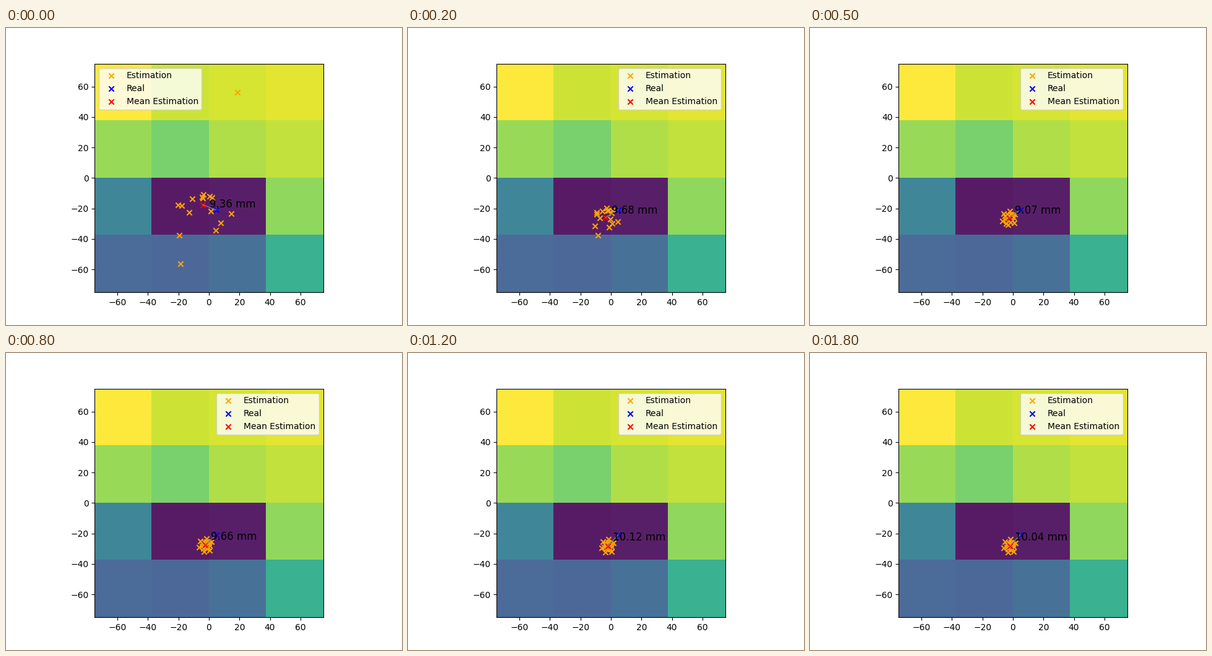
A matplotlib script that plays this animation: 640x480 px, repeating every 1.9 s.

```python
import numpy as np
import matplotlib.pyplot as plt
from matplotlib.animation import FuncAnimation

FRAMES = 19
DECAY = 0.55

# Points in the plane are complex numbers: x + iy
REAL = 4.75 - 20.9j
OUTLIER = 18.7 + 56.2j

# Distance and bearing of the mean, as seen from the real position
STEPS = [0, 1, 2, 5, 8, 12, 18]
DISTANCE = [9.36, 8.24, 9.68, 9.07, 9.66, 10.12, 10.04]
BEARING = [159, 188, 211, 216, 223.5, 226.5, 227]

HEAT = [
    [1.0, 0.915, 0.93, 0.955],
    [0.83, 0.77, 0.87, 0.90],
    [0.40, 0.0, 0.012, 0.815],
    [0.285, 0.27, 0.31, 0.605],
]


def ring(count, radius, start, step):
    angles = np.radians(start + step * np.arange(count))
    return radius * np.exp(1j * angles)


def centred(points):
    """Offsets from the mean, in order of angle."""
    offsets = points - points.mean()
    return offsets[np.argsort(np.angle(offsets))]


scattered = centred(
    np.array([-3.6, 0.4, 2.1, -4.4, -4.1, -10.9, -20.1, -17.7,
              -12.8, 1.4, 14.8, 7.9, 4.6, -19.4, -18.5])
    - 1j * np.array([10.8, 11.9, 12.9, 12.5, 13.4, 13.7, 17.8, 18.1,
                     22.6, 21.8, 23.4, 29.5, 34.5, 37.7, 56.4]))
settled = centred(np.concatenate([ring(6, 4.3, 31, 55), ring(9, 2.4, 35, 40)]))


def xy(points):
    return np.column_stack([np.real(points), np.imag(points)])


def state(i):
    """Distance, mean and all estimates at step i."""
    distance = np.interp(i, STEPS, DISTANCE)
    bearing = np.radians(np.interp(i, STEPS, BEARING))
    mean = REAL + distance * np.exp(1j * bearing)
    offsets = settled + (scattered - settled) * DECAY ** i
    if i >= 2:
        return distance, mean, mean + offsets
    # While the outlier is present the cluster balances it around the mean
    centre = mean + (mean - OUTLIER) / len(offsets)
    return distance, mean, np.append(centre + offsets, OUTLIER)


fig, ax = plt.subplots(figsize=(6.4, 4.8), dpi=100)
ax.imshow(HEAT, extent=(-75, 75, -75, 75), cmap="viridis", vmin=0, vmax=1,
          alpha=0.9, interpolation="nearest")
estimates = ax.scatter([], [], marker="x", color="orange", label="Estimation")
ax.scatter(REAL.real, REAL.imag, marker="x", color="blue", label="Real")
mean_mark = ax.scatter([], [], marker="x", color="red", label="Mean Estimation")
link, = ax.plot([], [], color="gray", lw=1)
label = ax.text(0, 0, "", fontsize=12)
ax.set(xlim=(-75, 75), ylim=(-75, 75))
legend = ax.legend(loc="upper left")


def update(i):
    distance, mean, points = state(i)
    middle = (mean + REAL) / 2
    estimates.set_offsets(xy(points))
    mean_mark.set_offsets(xy([mean]))
    link.set_data(*xy([mean, REAL]).T)
    label.set_position((middle.real, middle.imag))
    label.set_text(f"{distance:.2f} mm")
    legend.set_loc("upper left" if i < 2 else "upper right")
    return estimates, mean_mark, link, label, legend


anim = FuncAnimation(fig, update, frames=FRAMES, interval=100, repeat=True,
                     repeat_delay=0, blit=False)
plt.show()
```
